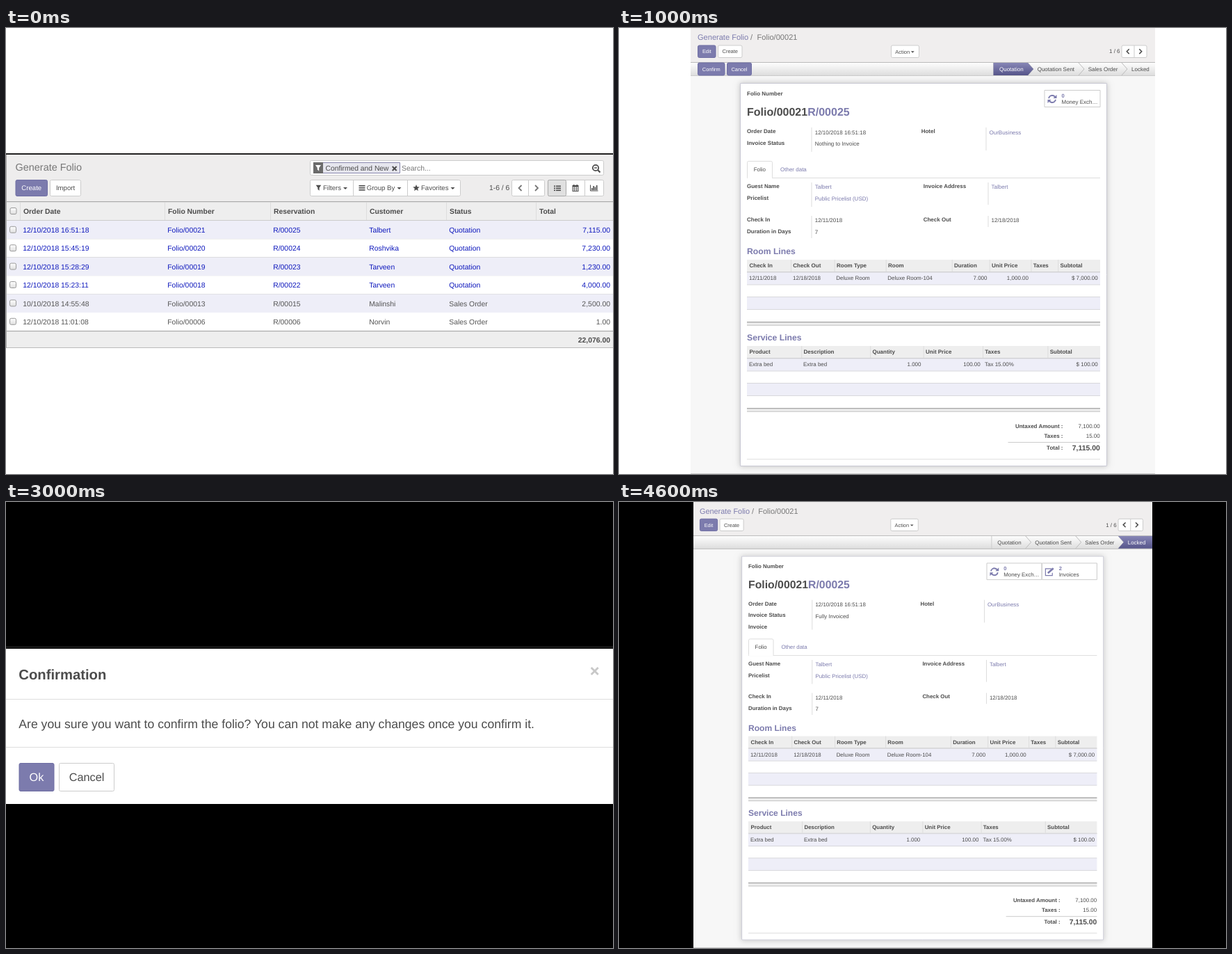
Recreate the animation shown at these times as an HTML page with a canvas. Size 873 px wide and 641 px high, loop 5 s.

```html
<!DOCTYPE html>
<html lang="en">
<head>
<meta charset="utf-8">
<title>Generate Folio</title>
<style>
html, body { margin: 0; width: 100%; height: 100%; overflow: hidden; background: #fff; }
canvas { display: block; }
</style>
</head>
<body>
<canvas id="stage" width="873" height="641"></canvas>
<script>
const W = 873, H = 641;
const c = document.getElementById('stage').getContext('2d');
c.textRendering = 'geometricPrecision';
const PURPLE = '#7c7bad', DARK = '#4c4c4c', LINE = '#ccc', PALE = '#ddd', STRIPE = '#eeeef8', BLUE = '#0f19bd';
const GUEST = 'Talbert', HOTEL = 'OurBusiness';

// ---- basic helpers; text y is the middle of the capitals ----
function text(s, x, y, size, color = DARK, bold = false, align = 'left') {
  c.font = `${bold ? 'bold ' : ''}${size}px "Liberation Sans", Arial, sans-serif`;
  c.textAlign = align;
  c.fillStyle = color;
  c.fillText(s, x, y + size * 0.36);
}
function box(x, y, w, h, fill) {
  c.fillStyle = fill;
  c.fillRect(x, y, w, h);
}
const hLine = (x1, x2, y, color = LINE) => box(x1, y, x2 - x1, 1, color);
const vLine = (x, y1, y2, color = LINE) => box(x, y1, 1, y2 - y1, color);

function frame(x, y, w, h, fill, stroke, r = 2) {
  c.beginPath();
  c.roundRect(x + 0.5, y + 0.5, w - 1, h - 1, r);
  c.fillStyle = fill;
  c.fill();
  c.strokeStyle = stroke;
  c.lineWidth = 1;
  c.stroke();
}
function button(label, x, y, w, h, size, primary) {
  frame(x, y, w, h, primary ? PURPLE : '#fff', primary ? '#6f6ea4' : LINE);
  text(label, x + w / 2, y + h / 2, size, primary ? '#fff' : DARK, false, 'center');
}
function fade(y1, y2, from, to) {
  const g = c.createLinearGradient(0, y1, 0, y2);
  g.addColorStop(0, from);
  g.addColorStop(1, to);
  return g;
}
function poly(points, fill) {
  c.beginPath();
  points.forEach(([x, y]) => c.lineTo(x, y));
  c.closePath();
  c.fillStyle = fill;
  c.fill();
}
function path(points, width, color = DARK) {
  c.beginPath();
  points.forEach(([x, y]) => c.lineTo(x, y));
  c.lineWidth = width;
  c.strokeStyle = color;
  c.stroke();
}

// ---- icons, centred on x, y ----
const caret = (x, y, r) => poly([[x - r, y - r / 2], [x + r, y - r / 2], [x, y + r / 2]], DARK);
const chevron = (x, y, r, dir, color) =>
  path([[x - dir * r / 2, y - r], [x + dir * r / 2, y], [x - dir * r / 2, y + r]], r * 0.45, color);
const funnel = (x, y, r, color) => poly([[x - r, y - r], [x + r, y - r], [x + r * 0.3, y],
  [x + r * 0.3, y + r * 1.1], [x - r * 0.3, y + r * 0.6], [x - r * 0.3, y]], color);

function cross(x, y, r, width, color) {
  path([[x - r, y - r], [x + r, y + r]], width, color);
  path([[x + r, y - r], [x - r, y + r]], width, color);
}
function star(x, y, r) {
  poly(Array.from({ length: 10 }, (_, i) => {
    const a = i * Math.PI / 5, q = i % 2 ? r * 0.45 : r;
    return [x + q * Math.sin(a), y - q * Math.cos(a)];
  }), DARK);
}
function magnifier(x, y) {
  c.beginPath();
  c.arc(x - 1, y - 1, 4.2, 0, 7);
  c.strokeStyle = DARK;
  c.lineWidth = 1.8;
  c.stroke();
  path([[x - 3, y - 1], [x + 1, y - 1]], 1.4);
  path([[x + 2, y + 2], [x + 5.5, y + 5.5]], 2.2);
}
function listIcon(x, y) {
  for (const dy of [-3.5, -0.5, 2.5]) {
    box(x - 5, y + dy, 2, 1.6, DARK);
    box(x - 2, y + dy, 7, 1.6, DARK);
  }
}
function calendar(x, y) {
  box(x - 4.5, y - 4, 9, 9, DARK);
  box(x - 3, y - 5, 1.5, 2, DARK);
  box(x + 1.5, y - 5, 1.5, 2, DARK);
  for (let i = 0; i < 9; i++) box(x - 3.6 + (i % 3) * 2.6, y - 1.5 + Math.floor(i / 3) * 2, 2, 1.4, '#fff');
}
function chart(x, y) {
  path([[x - 5, y - 4.5], [x - 5, y + 4], [x + 6, y + 4]], 1);
  [3, 6, 4.5, 7].forEach((h, i) => box(x - 3.5 + i * 2.3, y + 3 - h, 1.6, h, DARK));
}
function refresh(x, y) {
  for (const turn of [0, Math.PI]) {
    c.save();
    c.translate(x, y);
    c.rotate(turn);
    c.beginPath();
    c.arc(0, 0, 5, Math.PI * 1.06, Math.PI * 1.8);
    c.lineWidth = 2;
    c.strokeStyle = PURPLE;
    c.stroke();
    poly([[6.5, -6], [6.5, -1], [1.5, -1]], PURPLE);
    c.restore();
  }
}
function pencil(x, y) {
  path([[x + 3, y - 4.5], [x - 6, y - 4.5], [x - 6, y + 5.5], [x + 4, y + 5.5], [x + 4, y + 1.5]], 1.2, PURPLE);
  path([[x - 2.5, y + 2], [x + 5.5, y - 5]], 2.6, PURPLE);
}

// ---- list of folios ----
const columns = [['Order Date', 20], ['Folio Number', 228], ['Reservation', 380],
  ['Customer', 518], ['Status', 633], ['Total', 762]];
const orders = [
  ['12/10/2018 16:51:18', '21', '25', GUEST, '7,115.00'],
  ['12/10/2018 15:45:19', '20', '24', 'Roshvika', '7,230.00'],
  ['12/10/2018 15:28:29', '19', '23', 'Tarveen', '1,230.00'],
  ['12/10/2018 15:23:11', '18', '22', 'Tarveen', '4,000.00'],
  ['10/10/2018 14:55:48', '13', '15', 'Malinshi', '2,500.00'],
  ['12/10/2018 11:01:08', '06', '06', 'Norvin', '1.00']
];

function checkbox(x, y) {
  frame(x - 5, y - 5, 10, 10, fade(y - 5, y + 5, '#fff', '#ddd'), '#999');
}

function list() {
  box(0, 0, W, H, '#fff');
  box(0, 180, W, 2, '#222');
  box(0, 182, W, 68, '#eeeded');
  text('Generate Folio', 13.5, 199.5, 14.45, '#777');
  button('Create', 13.5, 218, 46.5, 24, 9.6, true);
  button('Import', 63, 218, 45, 24, 9.6);

  frame(437, 190, 423, 22, '#fff', LINE);
  frame(442, 193, 125, 16, '#e6e6ee', '#8887ad', 0);
  box(442, 193, 14, 16, '#6b6b6b');
  funnel(449, 201, 4, '#fff');
  text('Confirmed and New', 459.5, 201, 10.3);
  cross(558.7, 202, 3, 2, DARK);
  text('Search...', 569, 201.5, 10.4, '#777');
  magnifier(849, 202);

  frame(437, 218, 217, 24, '#fff', LINE);
  vLine(499, 219, 241);
  vLine(577, 219, 241);
  funnel(449.5, 229.5, 3.8, DARK);
  text('Filters', 456, 230, 9.6);
  for (const dy of [-4, -1, 2]) box(507.5, 230 + dy, 9, 1.6, DARK);
  text('Group By', 518.7, 230, 9.6);
  star(590, 230, 5);
  text('Favorites', 597, 230, 9.6);
  for (const x of [488, 565.5, 642.5]) caret(x, 230.5, 3);

  text('1-6 / 6', 695, 229, 10.3);
  frame(727, 218, 48, 24, '#fff', LINE);
  vLine(751, 219, 241);
  chevron(739.5, 230, 4, -1, '#777');
  chevron(763, 230, 4, 1, '#777');
  frame(779, 218, 81, 24, '#fff', LINE);
  frame(779, 218, 27, 24, '#e0e0e0', '#aaa');
  vLine(832, 219, 241);
  listIcon(793, 230);
  calendar(819, 230);
  chart(845.5, 230);

  box(0, 249, W, 1.5, '#aaa');
  box(0, 250.5, W, 26, '#eee');
  checkbox(10.5, 263);
  for (const [label, x] of columns) {
    vLine(x, 250, 276, PALE);
    text(label, x + 5, 263.5, 10.35, DARK, true);
  }
  hLine(0, W, 276);
  orders.forEach(([date, folio, res, name, total], i) => {
    const y = 277 + i * 26.4, mid = y + 13.3, quote = i < 4, color = quote ? BLUE : '#555';
    box(0, y, W, 26.4, i % 2 ? '#fff' : STRIPE);
    hLine(0, W, Math.round(y + 26), '#d8d8d8');
    checkbox(10, mid - 0.5);
    [date, 'Folio/000' + folio, 'R/000' + res, name, quote ? 'Quotation' : 'Sales Order']
      .forEach((s, k) => text(s, columns[k][1] + 4.2, mid, 10.4, color));
    text(total, 869, mid, 10.45, color, false, 'right');
  });
  box(0, 435, W, 1.5, '#aaa');
  box(0, 436.5, W, 23, '#eee');
  hLine(0, W, 459, '#bbb');
  text('22,076.00', 869, 448, 10.4, DARK, true, 'right');
  vLine(0, 182, 460, '#aaa');
}

// ---- folio form ----
const steps = ['Quotation', 'Quotation Sent', 'Sales Order', 'Locked'];
const stepX = [538.5, 588, 661, 723, 900], stepText = [547, 601.7, 674.7, 737];

function statusBar(active) {
  box(0, 50, W + 40, 19, fade(50, 69, '#fdfdfd', '#dcdcdc'));
  hLine(0, W + 40, 49, '#bbb');
  hLine(0, W + 40, 68, LINE);
  vLine(538, 50, 68);
  for (const x of stepX.slice(1, 4)) path([[x, 50], [x + 8, 59], [x, 68]], 1, '#bbb');
  const l = stepX[active], r = stepX[active + 1];
  poly([[l, 50], [r, 50], [r + 8, 59], [r, 68], [l, 68], [l + (active ? 8 : 0), 59]],
    fade(50, 68, '#8786b6', '#56558a'));
  steps.forEach((s, i) => text(s, stepText[i], 59, 8, i === active ? '#fff' : DARK));
}

function field(label, value, x, y, gap, color) {
  text(label, x, y, 8, DARK, true);
  text(value, x + gap, y + 1.3, 8, color);
}

function stat(x, icon, count, label) {
  frame(x, 89, 81, 25, '#fff', LINE, 0);
  icon(x + 11.5, 102);
  text(count, x + 25, 97.3, 7.6, PURPLE, true);
  text(label, x + 25, 106, 8);
}

// heads: [label, text x]; cells: [value, x, align]
function table(title, y, heads, cells) {
  text(title, 184, y, 12.2, PURPLE, true);
  box(184, y + 12, 508, 18, '#eee');
  hLine(184, 692, y + 29, LINE);
  heads.forEach(([label, x], i) => {
    if (i) vLine(x - 3.3, y + 12, y + 29, PALE);
    text(label, x, y + 20.3, 8, DARK, true);
  });
  for (const top of [30, 65.5]) {
    box(184, y + top, 508, 17.8, STRIPE);
    hLine(184, 692, y + top - 0.5, '#d8d8dc');
    hLine(184, 692, y + top + 17.5, '#d8d8dc');
  }
  for (const [s, x, align] of cells) text(s, x, y + 38.5, 8, DARK, false, align);
  box(184, y + 101, 508, 5.5, '#eee');
  box(184, y + 101, 508, 1.4, '#aaa');
  hLine(184, 692, y + 105.7, '#c4c4c4');
}

const roomHeads = [['Check In', 187.5], ['Check Out', 250.3], ['Room Type', 313], ['Room', 387],
  ['Duration', 482], ['Unit Price', 536], ['Taxes', 595.7], ['Subtotal', 634.5]];
const roomCells = [['12/11/2018', 187], ['12/18/2018', 250], ['Deluxe Room', 312.3],
  ['Deluxe Room-104', 386.3], ['7.000', 529.5, 'right'], ['1,000.00', 589, 'right'],
  ['$ 7,000.00', 688.7, 'right']];
const serviceHeads = [['Product', 187.5], ['Description', 265.5], ['Quantity', 364.5],
  ['Unit Price', 441], ['Taxes', 526.3], ['Subtotal', 619.7]];
const serviceCells = [['Extra bed', 187], ['Extra bed', 265], ['1.000', 434.5, 'right'],
  ['100.00', 519.7, 'right'], ['Tax 15.00%', 526], ['$ 100.00', 688.7, 'right']];

function form({ back, left, right, scale = 1, dx = 0, dy = 0, active, status, buttons, invoices }) {
  const shift = invoices ? 8.3 / scale : 0; // room for the extra invoice row
  box(0, 0, W, H, back);
  c.save();
  c.beginPath();
  c.rect(left, 0, right - left, H);
  c.clip();
  c.translate(dx, dy);
  c.scale(scale, scale);

  box(0, -1, W + 40, 51, '#f0eeee');
  box(0, 69, W + 40, H, '#f7f7f7');
  text('Generate Folio', 113, 13.5, 11.05, PURPLE);
  text('/', 189, 13.5, 11.05, '#777');
  text('Folio/00021', 198.5, 13.5, 11.1, '#777');
  button('Edit', 113, 24.5, 26.5, 18.5, 7.4, true);
  button('Create', 142, 24.5, 35.5, 18.5, 7.5);
  frame(391, 24.5, 41, 18.5, '#fff', LINE);
  text('Action', 397.3, 34, 7.5);
  caret(422.3, 34.5, 2.4);
  text('1 / 6', 705, 33.5, 8);
  frame(722.5, 24.5, 37, 18.5, '#fff', LINE);
  vLine(740.5, 25, 42.5);
  chevron(732, 33.7, 3.4, -1);
  chevron(750, 33.7, 3.4, 1);

  statusBar(active);
  for (const [label, x, w] of buttons) button(label, x, 49.5, w, 19, 7.4, true);

  c.save();
  c.shadowColor = 'rgba(0,0,0,.22)';
  c.shadowBlur = 8;
  box(174, 79, 528, 551 + shift, '#fff');
  c.restore();
  frame(174, 79, 528, 551 + shift, '#fff', '#c8c8d3', 0);

  text('Folio Number', 184, 94.2, 8, DARK, true);
  text('Folio/00021', 184, 119.8, 16, DARK, true);
  text('R/00025', 271.2, 119.8, 16, PURPLE, true);
  stat(invoices ? 531 : 611.5, refresh, '0', 'Money Exch…');
  if (invoices) stat(611.5, pencil, invoices, 'Invoices');

  vLine(276.5, 143, 178 + shift, PALE);
  vLine(527.5, 143, 176, PALE);
  field('Order Date', '12/10/2018 16:51:18', 184, 148.4, 97.7);
  field('Invoice Status', status, 184, 165.1, 97.7);
  if (invoices) text('Invoice', 184, 181.7, 8, DARK, true);
  field('Hotel', HOTEL, 434.7, 148.4, 97.8, PURPLE);

  c.translate(0, shift);
  hLine(184, 692, 215, PALE);
  frame(184, 191, 37, 26, '#fff', PALE);
  box(184, 216, 37, 3, '#fff');
  box(185, 215, 35, 1, '#fff');
  text('Folio', 193.7, 203.3, 8);
  text('Other data', 232, 203.3, 8, PURPLE);

  vLine(276.5, 222, 257, PALE);
  vLine(530.5, 222, 254, PALE);
  field('Guest Name', GUEST, 184, 227.3, 97.7, PURPLE);
  field('Pricelist', 'Public Pricelist (USD)', 184, 244, 97.7, PURPLE);
  field('Invoice Address', GUEST, 437.7, 227.3, 97.8, PURPLE);
  vLine(276.5, 270, 302, PALE);
  vLine(530.5, 270, 286, PALE);
  field('Check In', '12/11/2018', 184, 275.2, 97.7);
  field('Duration in Days', '7', 184, 292, 97.7);
  field('Check Out', '12/18/2018', 437.7, 275.2, 97.8);

  table('Room Lines', 321, roomHeads, roomCells);
  table('Service Lines', 445, serviceHeads, serviceCells);

  [['Untaxed Amount :', '7,100.00', 572], ['Taxes :', '15.00', 586.3], ['Total :', '7,115.00', 603]]
    .forEach(([label, value, y], i) => {
      text(label, 638.5, y + (i > 1 ? 0.5 : 0), 8, DARK, true, 'right');
      text(value, 691.7, y, i > 1 ? 10.4 : 8, DARK, i > 1, 'right');
    });
  hLine(559.5, 692, 595);
  hLine(184, 692, 619.3, PALE);
  c.restore();
}

// ---- confirmation dialog ----
function dialog() {
  box(0, 0, W, H, '#000');
  box(0, 207, W, 4, '#161616');
  box(0, 211, W, 223, '#fff');
  text('Confirmation', 18.3, 248, 20.25, DARK, true);
  cross(846.7, 243, 5, 2.8, '#c8c8c8');
  hLine(0, W, 283, PALE);
  text('Are you sure you want to confirm the folio? You can not make any changes once you confirm it.',
    18.3, 318.5, 17.64);
  hLine(0, W, 352, PALE);
  button('Ok', 18.5, 375, 51, 41, 16.3, true);
  button('Cancel', 76, 375, 80, 41, 16.3);
}

const scenes = [
  list,
  () => {
    form({ back: '#fff', left: 103, right: 771, active: 0, status: 'Nothing to Invoice',
      buttons: [['Confirm', 113, 39.5], ['Cancel', 155, 36]] });
    hLine(103, 771, 640);
  },
  () => {
    form({ back: '#000', left: 105, right: 769, scale: 0.993, dx: 5.3, dy: -0.4, active: 2,
      status: 'To Invoice', invoices: '1',
      buttons: [['Create Invoice', 112.5, 60.5], ['Cancel', 176, 36.7], ['Set to Done', 215.2, 52.5]] });
    vLine(107, 0, 364, '#666');
    box(105, 118, 2, 14, PURPLE);
  },
  dialog,
  () => {
    form({ back: '#000', left: 107, right: 767, scale: 0.987, dx: 4.4, dy: -0.4, active: 3,
      status: 'Fully Invoiced', invoices: '2', buttons: [] });
    hLine(107, 767, 640);
  }
];

let shown = -1;
function tick() {
  const index = Math.floor(performance.now() / 1000) % scenes.length;
  if (index !== shown) scenes[shown = index]();
  requestAnimationFrame(tick);
}
tick();
</script>
</body>
</html>
```
